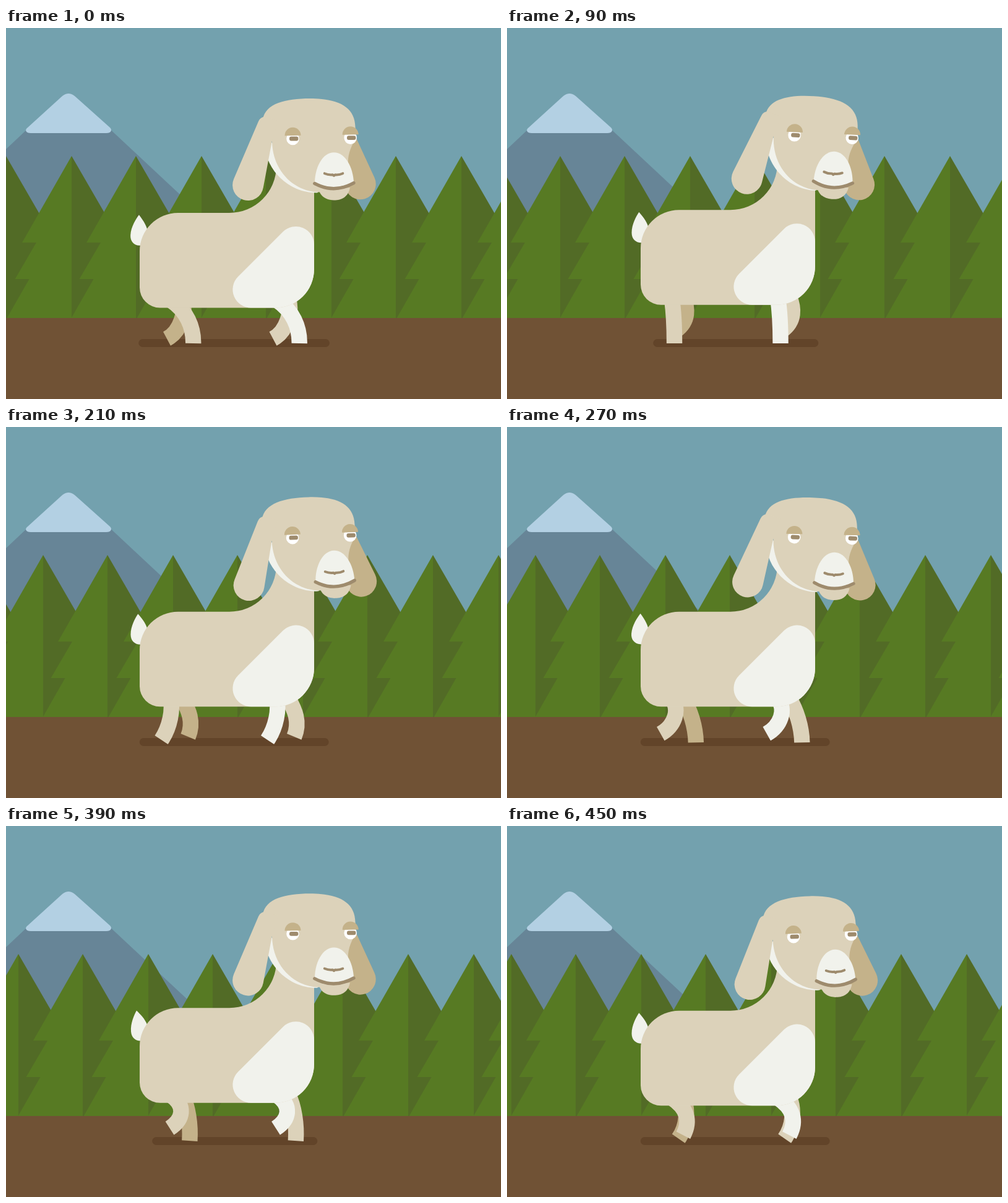
An HTML page that plays this animation: 800x600 px, repeating every 0.48 s.

```html
<!DOCTYPE html>
<html lang="en">
<head>
<meta charset="utf-8">
<title>Walking goat</title>
<style>
  html, body { margin: 0; width: 100%; height: 100%; overflow: hidden; background: #73a1ae; }
  svg { display: block; width: 100vw; height: 100vh; }
  .coat { fill: #dcd2ba; }
  .tan { fill: #c4b28a; }
  .white { fill: #f1f2ec; }
  .brown { fill: #9e8b6d; }
  .line { fill: none; stroke: #9e8b6d; stroke-linecap: round; stroke-linejoin: round; }
  .leg { fill: none; stroke-width: 25.4; }
</style>
</head>
<body>
<svg viewBox="0 0 800 600" xmlns="http://www.w3.org/2000/svg">
  <rect width="800" height="600" fill="#73a1ae"/>

  <path fill="#678597" d="M91 110.3Q101 102 111 110.3L495 469H-290Z"/>
  <path fill="#b3d0e3" d="M91 110Q101 102 111 110L168 161Q171 164 169.5 167Q168 170 162 170H40Q34 170 32.5 167Q31 164 35 161Z"/>

  <g id="trees"></g>

  <rect y="469" width="800" height="131" fill="#705235"/>
  <rect id="shadow" y="503" height="13" rx="6.5" fill="#624429"/>

  <path id="farRear" class="leg" stroke="#c4b28a"/>
  <path id="farFront" class="leg" stroke="#dcd2ba" transform="translate(171.5)"/>
  <path id="nearRear" class="leg" stroke="#dcd2ba"/>
  <path id="nearFront" class="leg" stroke="#f1f2ec" transform="translate(171.5)"/>

  <g id="goat">
    <path id="tail" class="white" d="M213.3 302.5C209 309 201.5 322 201.5 336C201.5 346 208 352 217 352C228 352 231 340 228.5 327C226 317 218 308 213.3 302.5Z"/>
    <path class="coat" d="M216 361A62 62 0 0 1 278 299H361A76 76 0 0 0 437 223L460 200H498V390A62.5 62.5 0 0 1 435.5 452.5H249A33 33 0 0 1 216 419.5Z"/>
    <path class="white" d="M375.1 402.1L447.6 329.6A29.5 29.5 0 0 1 498 350.5V390A62.5 62.5 0 0 1 435.5 452.5H396A29.5 29.5 0 0 1 375.1 402.1Z"/>

    <g id="head">
      <path class="tan" d="M563 165L566 178L595.3 241.6A25 25 0 1 1 548 256L552 215L555 180Z"/>
      <path class="white" d="M428 184L423 212C435 243 466 267 503 266.5L508 262L470 220Z"/>
      <path class="coat" d="M505 260C508 273 518 278.5 530 278.5C543 278.5 553 273 556 258Z"/>
      <path class="coat" d="M415 148C419 122 452 114 491 114C538 114 564 128 564.5 160L566 178C558 190 552 205 553 219L540 262L505 265.5C464 264 431 230 430 184L420 160Z"/>
      <path class="coat" d="M418 143.5Q411 144 408 151L368.2 244.1A25 25 0 1 0 415.8 258.1L430 182L440 150Z"/>
      <path class="white" d="M499 251C499 225 512 201.3 530 201.3C548 201.3 561 225 562 250Q531 267 499 251Z"/>
      <path class="line" stroke-width="4" d="M514.8 235.2Q521 238 528 237.3L530 238.8L532 237.3Q539 237.8 544.3 235.2"/>
      <path class="line" stroke-width="5.3" d="M498.8 251.4Q530 268.4 562 250.6"/>
      <circle fill="#fff" cx="463.5" cy="179" r="10.3"/>
      <circle fill="#fff" cx="556.7" cy="177.6" r="10.3"/>
      <path class="tan" d="M450.5 174.2A13 13.2 0 0 1 476.5 173.8Z"/>
      <path class="tan" d="M543.7 172.7A13 13.2 0 0 1 569.7 172.3Z"/>
      <rect class="brown" x="458" y="175.6" width="14.4" height="6.8" rx="3"/>
      <rect class="brown" x="551" y="174.2" width="14.4" height="6.8" rx="3"/>
    </g>
  </g>
</svg>

<script>
const LOOP = 480, STEP = 30, BEAT = 120;
const $ = id => document.getElementById(id);
const set = (id, name, value) => $(id).setAttribute(name, value);
const move = (id, value) => set(id, 'transform', value);

// Row of firs: shaded right half, then the jagged lit half
$('trees').innerHTML = Array.from({ length: 11 }, (_, i) => `
  <g transform="translate(${2 * Math.round(52.58 * i)} 207)">
    <path fill="#526b26" d="M0 0L105 181.5V263H0Z"/>
    <path fill="#577a23" d="M0 0L-80 140H-57L-91.5 199H-68.5L-105 263H0Z"/>
  </g>`).join('');

// One pose per beat
const gait = {
  near: { hip: 266, poses: [
    { x: 302.7, y: 510, tilt: 1, knee: 292 },
    { x: 268.4, y: 510, tilt: 0, knee: 267 },
    { x: 237.6, y: 503, tilt: 60, knee: 272 },
    { x: 262, y: 487.3, tilt: 61, knee: 291 }
  ] },
  far: { hip: 285, poses: [
    { x: 260, y: 502.5, tilt: 62, knee: 291 },
    { x: 274, y: 488, tilt: 54, knee: 292 },
    { x: 310, y: 511, tilt: -2, knee: 297 },
    { x: 299.3, y: 509.5, tilt: 0, knee: 294 }
  ] }
};

// Legs slow into every odd beat and speed up out of it
function setLegs(side, t, lift) {
  const { hip, poses } = gait[side];
  const beat = Math.floor(t / BEAT), u = t / BEAT - beat;
  const k = beat % 2 ? u * u : 1 - (1 - u) ** 2;
  const a = poses[beat], b = poses[(beat + 1) % 4];
  const mix = key => a[key] + (b[key] - a[key]) * k;

  const x = mix('x'), y = mix('y'), turn = mix('tilt') * Math.PI / 180;
  const ankleX = x + 26 * Math.sin(turn), ankleY = y - 26 * Math.cos(turn);
  const d = `M${hip} ${440 - lift}C${mix('knee')} ${457 - lift} ${ankleX} ${ankleY} ${x} ${y}`;
  set(side + 'Rear', 'd', d);
  set(side + 'Front', 'd', d);
}

const ease = u => u < 0.5 ? 4 * u ** 3 : 1 - 4 * (1 - u) ** 3;
const wave = (t, peak) => Math.cos(Math.PI * (t - peak) / BEAT);

function draw(t) {
  const rise = ease(1 - Math.abs(t / BEAT % 2 - 1));
  const lift = 5 * rise;

  move('trees', `translate(${-Math.round(106 * t / LOOP)})`);
  set('shadow', 'x', 214.3 + 23.4 * rise);
  set('shadow', 'width', 308.7 - 44.4 * rise);

  setLegs('near', t, lift);
  setLegs('far', t, lift);

  move('goat', `translate(0 ${-lift})`);
  move('tail', `rotate(${4.8 * wave(t, 30)} 220 330)`);
  move('head', `rotate(${1.05 + 2.74 * wave(t, 75)} 480 197)`);
}

function tick() {
  draw(Math.floor(performance.now() % LOOP / STEP) * STEP);
  requestAnimationFrame(tick);
}
tick();
</script>
</body>
</html>
```
